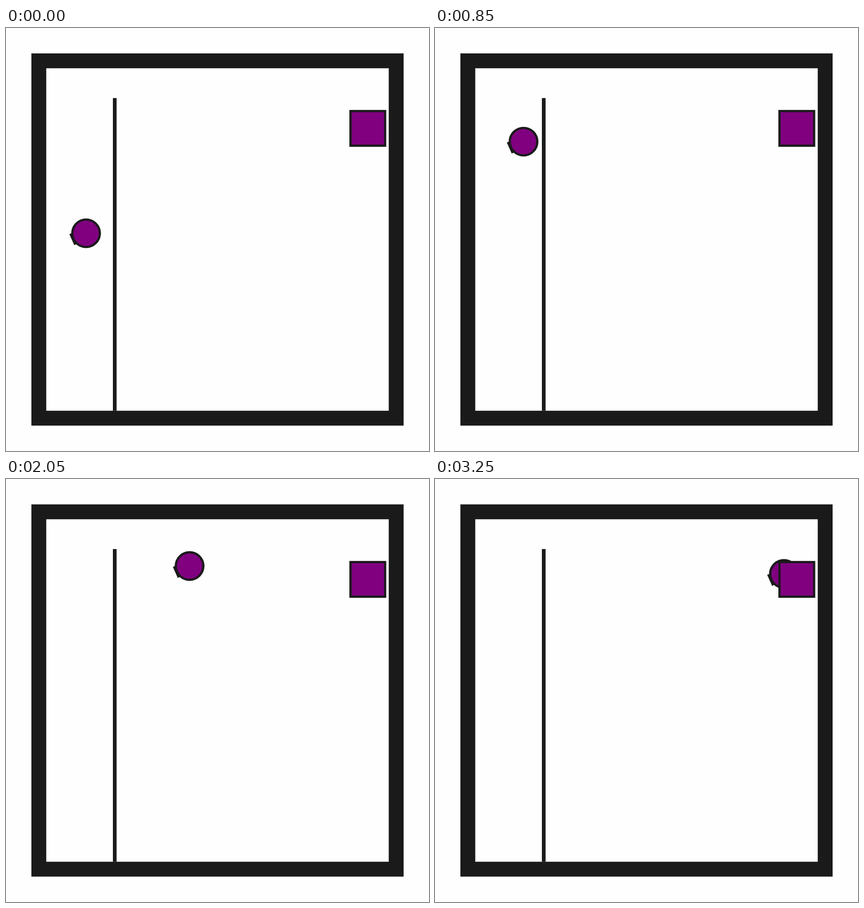
Recreate the animation shown at these times as an HTML page with a canvas. Size 748x748 px, loop 3300 ms.

```html
<!DOCTYPE html>
<html lang="en">
<head>
<meta charset="utf-8">
<title>Ball to goal</title>
<style>
  html, body { margin: 0; width: 100%; height: 100%; overflow: hidden; background: #fefefe; }
  canvas { display: block; }
</style>
</head>
<body>
<canvas id="stage" width="748" height="748"></canvas>
<script>
const ctx = document.getElementById("stage").getContext("2d");
const INK = "#1a1a1a", PURPLE = "#800080", PAPER = "#fefefe";
const SIZE = 748, MARGIN = SIZE * 0.06, ROOM = SIZE * 0.88;
const BORDER = ROOM * 0.04, LINE = ROOM * 0.006;
const STEP = 50, LOOP = 3300, SPEED = 12.3; // ms, ms, pixels per step

// Turning points of the walk; "wait" counts the steps lost against a wall.
const ROUTE = [
  { x: 141.6, y: 363 },
  { x: 166, y: 367.4, wait: 1 },
  { x: 152.5, y: 321.5 },
  { x: 166, y: 286.6 },
  { x: 155.7, y: 213.2 },
  { x: 161, y: 139.8 },
  { x: 154, y: 116 },
  { x: 170.3, y: 97, wait: 2 },
  { x: 241, y: 123 },
  { x: 300.3, y: 147.9 },
  { x: 458.6, y: 186.7 },
  { x: 568.3, y: 166 },
  { x: 617, y: 167.8 }
];

// Walks every leg at near-constant speed, in whole steps.
function walk(route) {
  const places = [route[0]];
  route.slice(1).forEach((to, i) => {
    const from = route[i];
    const dx = to.x - from.x, dy = to.y - from.y;
    const steps = Math.round(Math.hypot(dx, dy) / SPEED);
    for (let n = 1; n <= steps; n++) {
      places.push({ x: from.x + dx * n / steps, y: from.y + dy * n / steps });
    }
    for (let n = 0; n < (to.wait ?? 0); n++) places.push(to);
  });
  return places;
}

function fillBox(color, left, top, width, height) {
  ctx.fillStyle = color;
  ctx.fillRect(left, top, width, height);
}

function framedBox(left, top, size, border, inside) {
  fillBox(INK, left, top, size, size);
  fillBox(inside, left + border, top + border, size - 2 * border, size - 2 * border);
}

function drawRoom() {
  const wallTop = MARGIN + ROOM * 0.12;
  fillBox(PAPER, 0, 0, SIZE, SIZE);
  framedBox(MARGIN, MARGIN, ROOM, BORDER, PAPER);
  fillBox(INK, 189, wallTop, ROOM * 0.01, MARGIN + ROOM - BORDER - wallTop);
}

function drawBall({ x, y }) {
  ctx.save();
  ctx.translate(x, y);
  ctx.fillStyle = INK;
  ctx.beginPath();
  ctx.moveTo(-29.6, 1.6);
  ctx.lineTo(-20.9, 21.1);
  ctx.lineTo(-10, 16);
  ctx.lineTo(-18.5, -3);
  ctx.fill();
  ctx.beginPath();
  ctx.arc(0, 0, (ROOM * 0.08 - LINE) / 2, 0, Math.PI * 2);
  ctx.fillStyle = PURPLE;
  ctx.fill();
  ctx.strokeStyle = INK;
  ctx.lineWidth = LINE;
  ctx.stroke();
  ctx.restore();
}

const places = walk(ROUTE);
let start;

function render(now) {
  start ??= now;
  const step = Math.floor(((now - start) % LOOP) / STEP);
  drawRoom();
  drawBall(places[Math.min(step, places.length - 1)]);
  framedBox(607.2, 144.9, 65.2, LINE, PURPLE);
  requestAnimationFrame(render);
}
requestAnimationFrame(render);
</script>
</body>
</html>
```
